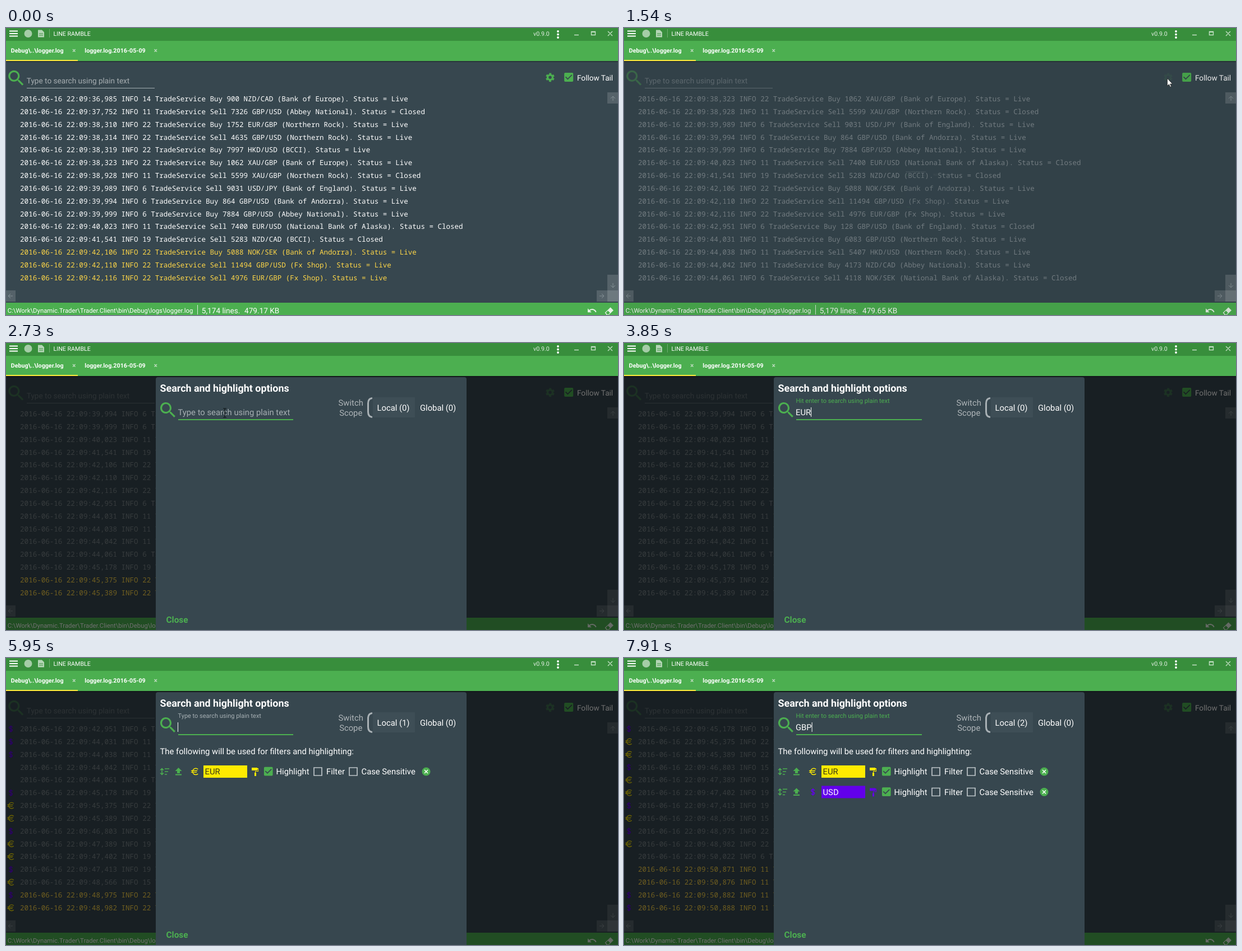
These frames come from a looping animation (1091 px wide and 513 px high, 8 s). An HTML page:

```html
<!DOCTYPE html>
<html lang="en">
<head>
<meta charset="utf-8">
<title>Log viewer</title>
<style>
  html, body { margin: 0; width: 100%; height: 100%; overflow: hidden; background: #37474f; }
  svg { position: fixed; inset: 0; width: 100%; height: 100%; }
  text { font-family: Roboto, sans-serif; fill: #fff; text-rendering: geometricPrecision; white-space: pre; }
  .small { font-size: 10.7px; }
  .body { font-size: 13.6px; }
  .dialog text { font-size: 14.8px; }
  .bold { font-weight: 700; }
  .log text { font: 500 12.54px "Noto Sans Mono", "DejaVu Sans Mono", monospace; }
  .green { fill: #4caf50; }
  .line { fill: none; stroke-width: 2; }
  .pale { fill: none; stroke: #c3dfc4; stroke-width: 1.4; }
</style>
</head>
<body>
<svg viewBox="0 0 1091 513" preserveAspectRatio="none">
  <defs>
    <path id="magnifier" d="M9.5 3A6.5 6.5 0 0 1 16 9.5C16 11.1 15.4 12.6 14.4 13.7L14.7 14H15.5L20.5 19L19 20.5L14 15.5V14.7L13.7 14.4A6.5 6.5 0 1 1 9.5 3M9.5 5A4.5 4.5 0 1 0 9.5 14A4.5 4.5 0 1 0 9.5 5Z"/>
    <path id="checked" fill-rule="evenodd" d="M10 17L5 12L6.4 10.6L10 14.2L17.6 6.6L19 8ZM19 3H5A2 2 0 0 0 3 5V19A2 2 0 0 0 5 21H19A2 2 0 0 0 21 19V5A2 2 0 0 0 19 3Z"/>
    <path id="eur" class="line" d="M19.5 6.5A7.8 7.8 0 1 0 19.5 17.5M2.5 10H18M2.5 14H16.5"/>
    <path id="usd" class="line" d="M16 8.5C16 4.8 8 4.8 8 9C8 13 16 11 16 15C16 19.2 8 19.2 8 15.5M12 3V21"/>
  </defs>

  <rect width="1091" height="513" fill="#37474f"/>

  <!-- search bar and options -->
  <g id="search">
    <use href="#magnifier" class="green" transform="translate(-.3 71.2) scale(1.54)"/>
    <text class="body" x="36.8" y="98.7" fill-opacity=".56">Type to search using plain text</text>
    <path d="M37 107.5H265" stroke="#a3adb1"/>
  </g>
  <g id="gear" fill="none" stroke="#4caf50">
    <circle cx="970" cy="88.3" r="4.4" stroke-width="3.4"/>
    <circle cx="970" cy="88.3" r="6.7" stroke-width="2.4" stroke-dasharray="3.9 3.12" stroke-dashoffset="5.46"/>
  </g>
  <use href="#checked" class="green" transform="translate(992.5 77.4) scale(.89)"/>
  <text class="body" x="1018" y="93.5">Follow Tail</text>

  <g class="log" id="log"></g>

  <!-- scroll bars -->
  <g fill="#fff" fill-opacity=".15">
    <path d="M1072 115h19v20h-19zM1072 441h19v28h-19zM0 469h17v20H0zM1053 469h19v20h-19z"/>
    <path d="M1072 469h19v20h-19z" fill-opacity=".27"/>
  </g>
  <path fill="none" stroke="#849095" d="M1082 130v-8m-4 4l4-4 4 4M1082 456v8m-4-4l4 4 4-4M12 479H4m4-4l-4 4 4 4M1058 479h8m-4-4l4 4-4 4"/>

  <!-- status bar -->
  <rect y="491" width="1091" height="22" class="green"/>
  <text x="2.7" y="508.5" font-size="11.35">C:\Work\Dynamic.Trader\Trader.Client\bin\Debug\logs\logger.log</text>
  <path d="M341.5 495V512" stroke="#dcefdd"/>
  <text id="lines" class="body" x="348.8" y="509.5"></text>
  <text id="size" class="body" x="425" y="509.5"></text>
  <path fill="#e6f3e6" transform="translate(1035.5 496) scale(.76)" d="M12.5 8C9.8 8 7.5 9 5.6 10.6L2 7V16H11L7.4 12.4C8.8 11.2 10.5 10.5 12.5 10.5C16 10.5 19 12.8 20.1 16L22.5 15.2C21 11 17.2 8 12.5 8Z"/>
  <path fill="#e6f3e6" fill-rule="evenodd" transform="translate(1066 497) scale(.77)" d="M15 3L22 10L10 21.5H7L2 15.6ZM4.2 15.6L8.5 20H9.8L14 15.6L9.2 10.6Z"/>

  <rect id="overlay" y="59" width="1091" height="454"/>

  <!-- title bar and tabs -->
  <rect y="59" width="1091" height="2" fill-opacity=".25"/>
  <rect width="1091" height="59" class="green"/>
  <rect width="1091" height="23" fill="#388e3c"/>
  <path d="M6 5.5H21M6 10H21M6 14.5H21" stroke="#fff" stroke-width="2"/>
  <circle cx="39.5" cy="10" r="7" fill="#a5cda7"/>
  <path fill="#b4d6b6" fill-rule="evenodd" d="M57 3.5h7l4 4v9H57zM59 9.5v1h7v-1zM59 12.5v1h7v-1z"/>
  <path d="M77.5 2V17" stroke="#6fae72"/>
  <text class="small" x="84.5" y="13.5">LINE RAMBLE</text>
  <text class="small" x="940" y="13.5" fill-opacity=".85">v0.9.0</text>
  <g fill="#fff"><circle cx="984" cy="6" r="1.9"/><circle cx="984" cy="11.5" r="1.9"/><circle cx="984" cy="17" r="1.9"/></g>
  <path class="pale" d="M1013 12.5H1021M1043.5 6.5H1050.5V12.5H1043.5ZM1043 7.2H1051M1073 6L1081 14M1081 6L1073 14"/>
  <text class="small bold" x="8.7" y="43.5">Debug\..\logger.log</text>
  <text class="small bold" x="140.3" y="43.5">logger.log.2016-05-09</text>
  <path class="pale" d="M119 38l4.5 4.5m0-4.5l-4.5 4.5M264.5 38l4.5 4.5m0-4.5l-4.5 4.5"/>
  <rect y="57" width="128" height="2" fill="#ffeb3b"/>

  <!-- dialog -->
  <g class="dialog" id="dialog">
    <rect x="267" y="61" width="554" height="457" rx="4" fill="#37474f"/>
    <text class="bold" x="274.5" y="87" style="font-size:17.9px">Search and highlight options</text>
    <use href="#magnifier" class="green" transform="translate(270.4 101.4) scale(1.54)"/>
    <path id="underline" stroke="#a3adb1"/>
    <path id="focusLine" stroke="#4caf50" stroke-width="2"/>
    <text id="hint" x="306.5"></text>
    <text id="typed" x="306" y="129"></text>
    <path id="caret" stroke="#fff"/>
    <g fill-opacity=".6" text-anchor="middle">
      <text x="614.7" y="111.5">Switch</text>
      <text x="614.7" y="129.5">Scope</text>
    </g>
    <rect x="654" y="97" width="75" height="36" fill="#3e4e56"/>
    <path d="M653 98.5Q645.5 99 645.5 108V123Q645.5 132 653 132.5" fill="none" stroke="#a9b1b5" stroke-width="3"/>
    <text id="local" x="661.5" y="120.5"></text>
    <text x="738" y="120.5">Global (0)</text>
    <text id="heading" x="274.5" y="172">The following will be used for filters and highlighting:</text>
    <g id="filters"></g>
    <text class="bold" x="285.5" y="499.5" style="font-size:15.4px;fill:#4caf50">Close</text>
  </g>

  <path id="arrow" d="M0 0V13.5L3 10.7L5.2 15.5L7.2 14.6L5.1 10H9.3Z" fill="#fff" stroke="#222" stroke-width=".8"/>
  <path id="beam" d="M-3 -8H3M0 -8V8M-3 8H3" stroke="#0d1417" stroke-width="1.2"/>
</svg>

<script>
const LOOP = 8000, ROWS = 15, OPEN_AT = 1464, OPEN_TIME = 300, FOCUS_AT = 2520;
const $ = id => document.getElementById(id);
const clamp = x => Math.max(0, Math.min(1, x));
const mix = (a, b, k) => a + (b - a) * k;
const ease = x => (1 - Math.cos(Math.PI * clamp(x))) / 2;
const setAttrs = (el, attrs) => { for (const k in attrs) el.setAttribute(k, attrs[k]); };
const show = (el, on) => el.setAttribute("visibility", on ? "visible" : "hidden");

// time, thread, trade, bank, status
const entries = `36,985|14|Buy 900 NZD/CAD|Bank of Europe|Live
37,752|11|Sell 7326 GBP/USD|Abbey National|Closed
38,310|22|Buy 1752 EUR/GBP|Northern Rock|Live
38,314|22|Sell 4635 GBP/USD|Northern Rock|Live
38,319|22|Buy 7997 HKD/USD|BCCI|Live
38,323|22|Buy 1062 XAU/GBP|Bank of Europe|Live
38,928|11|Sell 5599 XAU/GBP|Northern Rock|Closed
39,989|6|Sell 9031 USD/JPY|Bank of England|Live
39,994|6|Buy 864 GBP/USD|Bank of Andorra|Live
39,999|6|Buy 7884 GBP/USD|Abbey National|Live
40,023|11|Sell 7400 EUR/USD|National Bank of Alaska|Closed
41,541|19|Sell 5283 NZD/CAD|BCCI|Closed
42,106|22|Buy 5088 NOK/SEK|Bank of Andorra|Live
42,110|22|Sell 11494 GBP/USD|Fx Shop|Live
42,116|22|Sell 4976 EUR/GBP|Fx Shop|Live
42,951|6|Buy 128 GBP/USD|Bank of England|Closed
44,031|11|Buy 6083 GBP/USD|Northern Rock|Live
44,038|11|Sell 5407 HKD/USD|Northern Rock|Live
44,042|11|Buy 4173 NZD/CAD|Abbey National|Live
44,061|6|Sell 4118 NOK/SEK|National Bank of Alaska|Closed
45,178|19|Buy 3120 GBP/USD|BCCI|Closed
45,375|22|Sell 2204 EUR/GBP|Fx Shop|Live
45,389|22|Buy 6418 EUR/USD|Fx Shop|Live
46,803|15|Sell 795 HKD/USD|BCCI|Closed
47,389|19|Buy 8260 EUR/GBP|Bank of Europe|Live
47,402|19|Sell 1377 EUR/USD|Northern Rock|Live
47,413|19|Buy 5921 GBP/USD|Fx Shop|Live
48,566|15|Buy 3308 EUR/USD|BCCI|Closed
48,975|22|Sell 946 USD/JPY|Fx Shop|Live
48,982|22|Buy 7015 EUR/GBP|Abbey National|Live
50,022|6|Sell 2640 NZD/CAD|Bank of Andorra|Closed
50,871|11|Buy 1839 XAU/GBP|Bank of Europe|Live
50,876|11|Sell 4402 NOK/SEK|Fx Shop|Live
50,882|11|Buy 9173 GBP/USD|Northern Rock|Live
50,888|11|Sell 588 HKD/USD|BCCI|Live`.split("\n").map(row => {
  const [time, thread, trade, bank, status] = row.split("|");
  return `2016-06-16 22:09:${time} INFO ${thread} TradeService ${trade} (${bank}). Status = ${status}`;
});

// [time, total entries]; the newest batch glows, then fades
const batches = [[0, 15], [490, 16], [1460, 20], [2520, 21], [2700, 23], [3990, 24],
                 [4550, 27], [5530, 28], [5740, 30], [6650, 31], [7560, 35]];
const QUIET_BATCH = 2;

const typing = [[0, ""], [3290, "E"], [3570, "EU"], [3780, "EUR"], [4060, ""],
                [5110, "U"], [5300, "US"], [5480, "USD"], [5950, ""],
                [6860, "G"], [7140, "GB"], [7420, "GBP"]];
const pointer = [[420, 1091, 200], [820, 987.5, 101], [930, 987.5, 101], [1190, 968.5, 90],
                 [1740, 968.5, 90], [2170, 480, 240], [2310, 386, 157], [2500, 390, 125]];

const filters = [
  { term: "EUR", icon: "#eur", color: "#ffea00", ink: "#3a3a14", entered: 4060, listed: 4480, y: 203 },
  { term: "USD", icon: "#usd", color: "#6200ea", ink: "#fff", entered: 5950, listed: 6370, y: 239.5 }
];

$("filters").innerHTML = filters.map(f => `
  <g id="${f.term}" transform="translate(0 ${f.y})">
    <path fill="none" stroke="#4caf50" stroke-width="1.5" d="M278 -5V5M275 -2.5l3-3 3 3M275 2.5l3 3 3-3M283 -5h8M283 0h6M283 5h4"/>
    <path class="green" d="M307.5 -7l-6 6h3.5v4h5v-4h3.5zM302 4.5h11v2h-11z"/>
    <use href="${f.icon}" stroke="${f.color}" transform="translate(328.2 -8.7) scale(.72)"/>
    <rect x="352" y="-11" width="78" height="22" fill="${f.color}"/>
    <text x="354.5" y="5" style="fill:${f.ink}">${f.term}</text>
    <path fill="${f.color}" d="M438 -7h10v1h2v6h-5v2h1v6h-3v-6h1v-3h5v-3h-1v2h-10z"/>
    <use href="#checked" class="green" transform="translate(457.3 -10.8) scale(.87)"/>
    <text x="481.5" y="5">Highlight</text>
    <path fill="none" stroke="#bcc4c7" stroke-width="1.7" d="M549 -7h14v14h-14zM612 -7h14v14h-14z"/>
    <text x="571" y="5">Filter</text>
    <text x="633.5" y="5">Case Sensitive</text>
    <circle cx="749" r="7.5" class="green"/>
    <path d="M746 -3l6 6m0-6l-6 6" stroke="#fff" stroke-width="1.5"/>
  </g>`).join("");

$("log").innerHTML = Array.from({ length: ROWS }, (_, i) => {
  const y = 131 + i * 22.84;
  return `<use transform="translate(.5 ${y - 12.5}) scale(.68)"/><text x="25.1" y="${y}"></text>`;
}).join("");
const logTexts = [...$("log").querySelectorAll("text")];
const logIcons = [...$("log").querySelectorAll("use")];

const lastIndex = (list, t) => list.findLastIndex(item => item[0] <= t);

function drawLog(t, enabled) {
  const batch = lastIndex(batches, t);
  const [arrived, total] = batches[batch];
  const firstNew = batch ? batches[batch - 1][1] : 12;
  const fade = batch === QUIET_BATCH ? 0 : 1 - clamp((t - arrived - 550) / 400);
  for (let i = 0; i < ROWS; i++) {
    const index = total - ROWS + i, line = entries[index];
    const glow = index >= firstNew ? fade : 0;
    logTexts[i].textContent = line;
    logTexts[i].style.fill = `rgb(255,${mix(255, 215, glow)},${mix(255, 72, glow)})`;
    logTexts[i].style.fillOpacity = mix(enabled ? 1 : .35, 1, glow);
    const match = filters.find(f => t >= f.entered && line.includes(f.term));
    show(logIcons[i], match);
    if (match) setAttrs(logIcons[i], { href: match.icon, stroke: match.color });
  }
  $("lines").textContent = `5,${159 + total} lines.`;
  $("size").textContent = `${(479.17 + (total - ROWS) * .096).toFixed(2)} KB`;
}

function drawField(t) {
  const text = typing[lastIndex(typing, t)][1];
  const changed = typing.findLast(([at, s]) => at <= t && s.length < 2)[0] || -LOOP;
  const moved = ease((t - changed) / 220);
  const lift = text ? moved : 1 - moved;
  const right = text ? 531 : 512, middle = (307 + right) / 2;
  const half = (right - 307) / 2 * ease((t - FOCUS_AT) / 180);

  $("hint").textContent = `${text ? "Hit enter" : "Type"} to search using plain text`;
  $("hint").style.fontSize = mix(14.8, 11, lift) + "px";
  $("hint").style.fill = text ? "#4caf50" : "#a7b0b4";
  $("hint").setAttribute("y", mix(129, 107, lift));
  $("typed").textContent = text;
  $("underline").setAttribute("d", `M307 137H${right}`);
  $("focusLine").setAttribute("d", `M${middle - half} 137H${middle + half}`);

  const caretX = 306.5 + (text ? $("typed").getComputedTextLength() : 0);
  $("caret").setAttribute("d", `M${caretX} 115V132`);
  show($("caret"), t >= FOCUS_AT && (text || (t - 210) % 560 < 280));
}

function drawPointer(t) {
  const i = lastIndex(pointer, t);
  const [t0, x0, y0] = pointer[Math.max(i, 0)];
  const [t1, x1, y1] = pointer[Math.min(i + 1, pointer.length - 1)];
  const k = t1 > t0 ? (t - t0) / (t1 - t0) : 0;
  const x = mix(x0, x1, k), y = mix(y0, y1, k);
  const overField = x > 306 && x < 512 && y < 138;
  const visible = i >= 0 && t < typing[1][0];
  for (const id of ["arrow", "beam"]) {
    $(id).setAttribute("transform", `translate(${x} ${y})`);
    show($(id), visible && overField === (id === "beam"));
  }
}

function draw(t) {
  const enabled = t < OPEN_AT, open = ease((t - OPEN_AT) / OPEN_TIME);
  drawLog(t, enabled);
  drawField(t);
  drawPointer(t);
  $("search").setAttribute("opacity", enabled ? 1 : .4);
  $("gear").setAttribute("opacity", enabled ? 1 : open < 1 ? .1 : .4);
  $("overlay").setAttribute("opacity", .56 * open);
  setAttrs($("dialog"), {
    opacity: open,
    transform: `translate(544 289) scale(${open}) translate(-544 -289)`
  });
  const listed = filters.filter(f => t >= f.listed).length;
  filters.forEach((f, i) => $(f.term).setAttribute("display", i < listed ? "inline" : "none"));
  $("heading").setAttribute("display", listed ? "inline" : "none");
  $("local").textContent = `Local (${listed})`;
}

const start = performance.now();
(function frame() {
  draw((performance.now() - start) % LOOP);
  requestAnimationFrame(frame);
})();
</script>
</body>
</html>
```
